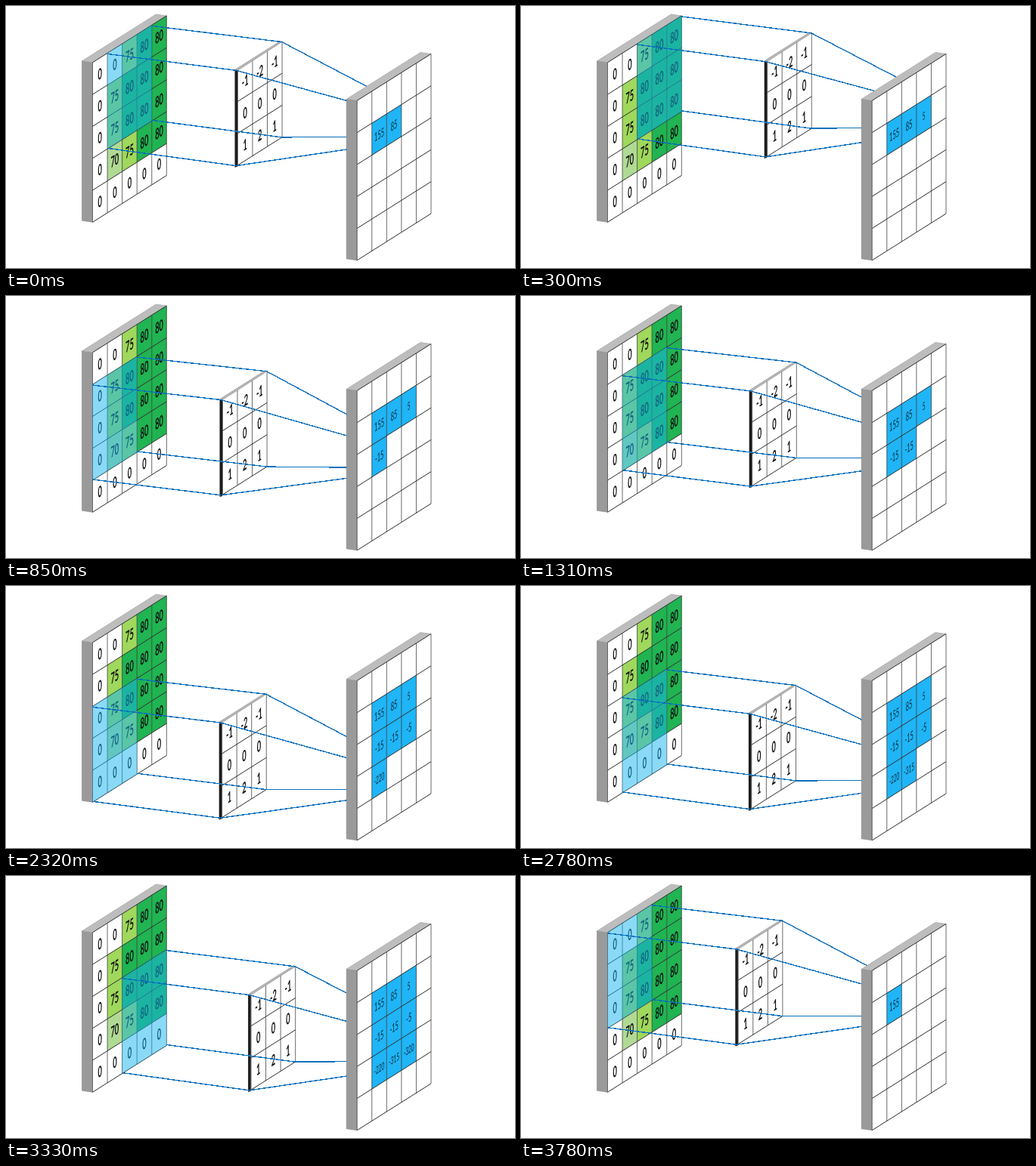
Animation, 673 px wide and 347 px high, one loop 4.26 s. Source, as an HTML page:

```html
<!DOCTYPE html>
<html lang="en">
<head>
<meta charset="utf-8">
<title>Convolution</title>
<style>
html, body { margin: 0; width: 100%; height: 100%; overflow: hidden; background: #fff; }
svg { display: block; width: 673px; height: 347px; }
text { font-family: Lato, Carlito, "Open Sans", sans-serif; text-anchor: middle; fill: #111; }
.bold { font-weight: 700; }
.thin { font-weight: 400; fill: #0b2a3c; }
.grid { fill: none; stroke: #2c2c2c; stroke-width: 1; vector-effect: non-scaling-stroke; }
.upright { stroke-width: .7; }
.rays { fill: none; stroke: #0a70bd; stroke-width: 1.4; shape-rendering: crispEdges; }
</style>
</head>
<body>
<svg id="stage" viewBox="0 0 673 347"></svg>
<script>
const CELL = 42.3, DX = 19.56, DY = -12.37;
const INPUT = [
  [0, 0, 75, 80, 80],
  [0, 75, 80, 80, 80],
  [0, 75, 80, 80, 80],
  [0, 70, 75, 80, 80],
  [0, 0, 0, 0, 0]
];
const KERNEL = [[-1, -2, -1], [0, 0, 0], [1, 2, 1]];
const OUTPUT = [155, 85, 5, -15, -15, -5, -220, -315, -320];
const SHADES = { 0: '#fff', 70: '#b0da94', 75: '#9fd85c', 80: '#20b452' };
const LEFT = { x: 114.5, y: 74.8 }, RIGHT = { x: 464.2, y: 125.3 };
const LOOP = 4260;
// start time of each step; the loop opens on the second window position
const STARTS = [0, 300, 850, 1310, 1840, 2320, 2780, 3330, 3780];

const stage = document.getElementById('stage');

function add(parent, tag, attrs, label) {
  const el = document.createElementNS('http://www.w3.org/2000/svg', tag);
  for (const key in attrs) el.setAttribute(key, attrs[key]);
  if (label !== undefined) el.textContent = label;
  parent.appendChild(el);
  return el;
}

const skew = (x, y) => `matrix(${DX / CELL} ${DY / CELL} 0 1 ${x} ${y})`;
const corner = (o, r, c) => [o.x + DX * c, o.y + DY * c + CELL * r];

function box(parent, r, c, n, fill) {
  return add(parent, 'rect', { x: c * CELL, y: r * CELL, width: n * CELL, height: n * CELL, fill });
}

function label(parent, r, c, value, cls, size) {
  add(parent, 'text', {
    class: cls, 'font-size': size, x: (c + .5) * CELL, y: (r + .5) * CELL + size * .36
  }, value);
}

function grid(parent, n) {
  let across = '', upright = '';
  for (let i = 0; i <= n; i++) {
    across += `M0 ${i * CELL}h${n * CELL}`;
    upright += `M${i * CELL} 0v${n * CELL}`;
  }
  add(parent, 'path', { class: 'grid', d: across });
  add(parent, 'path', { class: 'grid upright', d: upright });
}

function slab(o) {
  const w = 5 * DX, h = 5 * CELL, dy = 5 * DY;
  add(stage, 'path', { fill: '#9a9a9a', stroke: '#858585', 'stroke-width': .6,
    d: `M${o.x} ${o.y}l-14 -2v${h}l14 2z` });
  add(stage, 'path', { fill: '#bdbdbd', stroke: '#9c9c9c', 'stroke-width': .6,
    d: `M${o.x} ${o.y}l-14 -2l${w} ${dy}l14 2z` });
  const face = add(stage, 'g', { transform: skew(o.x, o.y) });
  box(face, 0, 0, 5, '#fff');
  return face;
}

const input = slab(LEFT);
INPUT.forEach((row, r) => row.forEach((v, c) => box(input, r, c, 1, SHADES[v])));
grid(input, 5);
INPUT.forEach((row, r) => row.forEach((v, c) => label(input, r, c, v, 'bold', 20)));
const view = box(input, 0, 0, 3, '#16b5f0');
view.setAttribute('fill-opacity', .5);

const kernel = add(stage, 'g', {});
const plate = add(kernel, 'g', { transform: skew(2.2, -1.3) });
box(plate, 0, 0, 3, '#fff');
grid(plate, 3);
KERNEL.forEach((row, r) => row.forEach((v, c) => label(plate, r, c, v, 'bold', 20)));
add(kernel, 'path', { fill: '#b5b5b5', stroke: '#8c8c8c', 'stroke-width': .5,
  d: 'M-1.5 -1L58.5 -39L60.5 -37.5L1.5 .5z' });
add(kernel, 'path', { fill: '#1c1c1c', d: 'M-1.7 -.5h3.6v128l-3.6 1z' });

const rays = add(stage, 'path', { class: 'rays' });

const output = slab(RIGHT);
const results = OUTPUT.map((v, i) => {
  const r = 1 + Math.floor(i / 3), c = 1 + i % 3;
  const g = add(output, 'g', {});
  const length = String(v).length;
  box(g, r, c, 1, '#1fb5f6');
  label(g, r, c, v, 'thin', length === 1 || length === 4 ? 14 : 16);
  return g;
});
grid(output, 5);

let shown = -1;

function show(step) {
  const r = Math.floor(step / 3), c = step % 3;
  const kx = 285 - .8 * r + 19.2 * c, ky = [97, 137.5, 181][r] - 11.7 * c;
  view.setAttribute('x', c * CELL);
  view.setAttribute('y', r * CELL);
  kernel.setAttribute('transform', `translate(${kx} ${ky})`);

  let d = '';
  for (const [v, h] of [[0, 0], [0, 1], [1, 0], [1, 1]]) {
    const from = corner(LEFT, r + 3 * v, c + 3 * h);
    const via = [kx + 60.5 * h, ky - 37.7 * h + 126.3 * v];
    const to = corner(RIGHT, r + 1 + v, c + 1 + h);
    from[1] += 1 - 2 * v;
    to[1] -= 3 * (1 - h);
    d += `M${from}L${via}L${to}`;
  }
  rays.setAttribute('d', d);
  results.forEach((g, i) => g.setAttribute('visibility', i <= step ? 'visible' : 'hidden'));
}

function tick() {
  const t = performance.now() % LOOP;
  const step = STARTS.filter(s => s <= t).length % 9;
  if (step !== shown) show(shown = step);
  requestAnimationFrame(tick);
}
tick();
</script>
</body>
</html>
```
